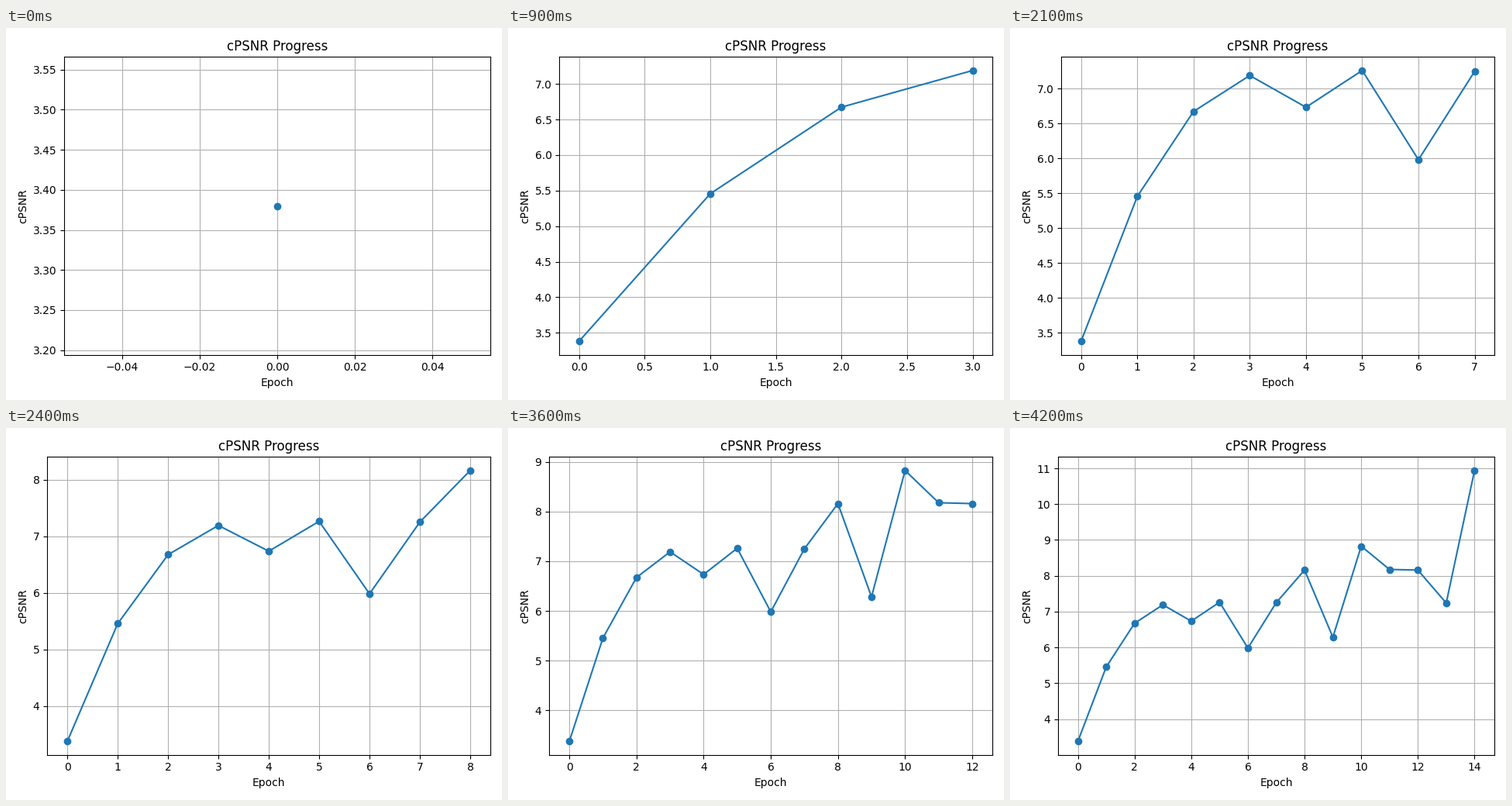
These frames come from a looping animation (640x480 px, 4500 ms). A matplotlib script:

```python
import matplotlib.pyplot as plt
from matplotlib.animation import FuncAnimation

SCORES = [3.38, 5.456, 6.674, 7.19, 6.735, 7.262, 5.983, 7.25,
          8.16, 6.285, 8.826, 8.177, 8.16, 7.24, 10.94]
STEP_MS = 300

fig = plt.figure(figsize=(6.4, 4.8), dpi=100)


def draw(frame):
    """Plot the scores up to this epoch, with axes fitted to them."""
    fig.clear()
    # Start from default margins so each layout is independent of the last.
    fig.subplots_adjust(left=0.125, right=0.9, bottom=0.11, top=0.88)
    ax = fig.add_subplot()
    count = frame + 1
    ax.plot(range(count), SCORES[:count], marker="o")
    ax.set_title("cPSNR Progress")
    ax.set_xlabel("Epoch")
    ax.set_ylabel("cPSNR")
    ax.grid(True)
    fig.tight_layout()
    return []


anim = FuncAnimation(fig, draw, frames=len(SCORES), init_func=lambda: draw(0),
                     interval=STEP_MS, repeat=True, repeat_delay=0, blit=False)

plt.show()
```
